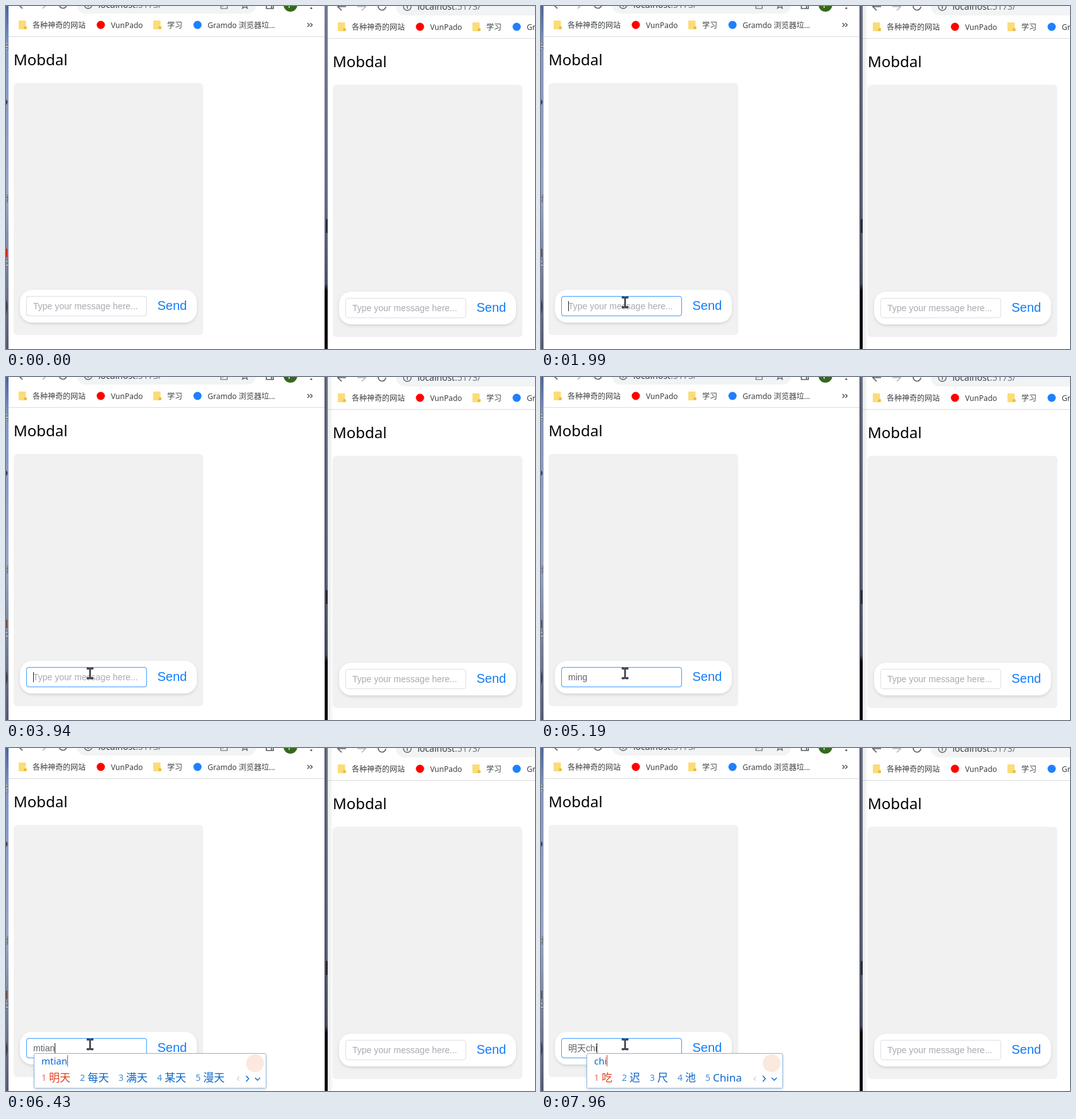
Write an HTML page that moves like this. It is 837 by 544 pixels and loops after 8000 ms.

```html
<!DOCTYPE html>
<html lang="zh-CN">
<head>
<meta charset="utf-8">
<style>
  html, body { margin: 0; width: 837px; height: 544px; overflow: hidden; background: #fff; }
  svg { display: block; }
  text { white-space: pre; }
  .ui { font: 12px "Noto Sans", "Noto Sans CJK SC", sans-serif; fill: #3c4043; }
  .url { font-size: 14px; }
  .title { font-size: 24px; fill: #000; }
  .field { font: 14px "Liberation Sans", "Noto Sans CJK SC", sans-serif; fill: #606266; }
  .hint { fill: #a8abb2; }
  .send { font: 20px "Liberation Sans", sans-serif; fill: #107cfb; }
  .ime { font: 17px "Noto Sans", "Noto Sans CJK SC", "DejaVu Sans", sans-serif; fill: #0a66cc; }
  .ime .num { font-size: 14px; fill: #3f8ed2; }
  .ime .first { fill: #e2401c; }
  .ime .num.first { fill: #ee6666; }
  .ime .typed { font-size: 15px; }
  .icon { fill: none; stroke: #5f6368; stroke-width: 1.7; }
</style>
</head>
<body>
<svg width="837" height="544" viewBox="0 0 837 544">
  <defs>
    <linearGradient id="desk" x2="0" y2="1">
      <stop offset="0" stop-color="#4a64a2"/>
      <stop offset=".12" stop-color="#8298c6"/>
      <stop offset=".55" stop-color="#99a7c8"/>
      <stop offset="1" stop-color="#555a72"/>
    </linearGradient>
    <linearGradient id="gap" x2="0" y2="1">
      <stop offset="0" stop-color="#717a92"/>
      <stop offset=".6" stop-color="#616a86"/>
      <stop offset=".81" stop-color="#4c5268"/>
      <stop offset=".83" stop-color="#0c0c10"/>
    </linearGradient>
    <linearGradient id="shade">
      <stop offset="0" stop-opacity=".13"/>
      <stop offset="1" stop-opacity="0"/>
    </linearGradient>
    <filter id="soft" x="-10%" y="-20%" width="120%" height="150%">
      <feDropShadow dx="0" dy="2" stdDeviation="2" flood-opacity=".13"/>
    </filter>
    <g id="folder">
      <path d="M1 0h9.500a1 1 0 0 1 1 1v8.500h1.500v3.500a1 1 0 0 1-1 1h-11a1 1 0 0 1-1-1v-12a1 1 0 0 1 1-1z" fill="#fbdc79"/>
      <path d="M8.500 13.500v-4h4v3.500z" fill="#e6b93c"/>
    </g>
    <g id="window">
      <rect x="4" y="-10" width="500" height="570" fill="#fff"/>
      <rect x="112" y="-16" width="284" height="28" rx="14" fill="#f1f3f4"/>
      <g class="icon">
        <path d="M33-2h-13M26-8l-6 6 6 6"/>
        <path d="M51-2h13M58-8l6 6-6 6" stroke="#b4b7ba"/>
        <path d="M96-2a6 6 0 1 1-2-5"/>
        <circle cx="130" cy="-2" r="6" stroke-width="1.400"/>
        <path d="M130-3v4.500" stroke-width="1.500"/>
        <path d="M340-3v7h10v-4M343 1q1-5 7-5" stroke-width="1.200"/>
        <path d="M378-8l1.800 4 4 .4-3 3 1 4.200-3.800-2.200-3.800 2.200 1-4.200-3-3 4-.4z" stroke-width="1.300"/>
        <path d="M412-7h11v11h-11zM420-7v11"/>
      </g>
      <text class="ui url" x="146" y="3">localhost<tspan fill="#70757a">:5173/</tspan></text>
      <circle cx="450" cy="-2" r="11" fill="#33691e"/>
      <path d="M448-6v9M448-1h5" stroke="#fff" stroke-width="1.300"/>
      <circle cx="483" cy="3.500" r="1.600" fill="#5f6368"/>
      <use href="#folder" x="20" y="23"/>
      <use href="#folder" x="233" y="23"/>
      <circle cx="150" cy="30" r="6.500" fill="#f00"/>
      <circle cx="303" cy="30" r="6.500" fill="#1e80ff"/>
      <g class="ui">
        <text x="42" y="35">各种神奇的网站</text>
        <text x="166" y="35">VunPado</text>
        <text x="255" y="35">学习</text>
        <text x="319" y="35">Gramdo 浏览器垃...</text>
        <text class="title" x="12" y="94">Mobdal</text>
      </g>
      <path class="icon" d="M477 27l3 3-3 3M481.500 27l3 3-3 3" stroke-width="1.400"/>
      <path d="M4 48.500h500" stroke="#dadce0"/>
      <rect x="12" y="122" width="300" height="400" rx="6" fill="#f1f1f1"/>
      <rect x="22" y="450" width="280" height="52" rx="20" fill="#fff" filter="url(#soft)"/>
      <rect x="32.500" y="460.500" width="190" height="31" rx="3.500" fill="#fff" stroke="#dcdfe6"/>
      <text class="send" x="239.500" y="482">Send</text>
    </g>
  </defs>

  <rect width="5" height="544" fill="url(#desk)"/>
  <path d="M0 58h3v2h-3M0 63h4v2h-4M0 67h3v2h-3M0 300h4v2h-4M0 305h4v2h-4M2 300v12M0 404h3v2h-3M0 410h4v2h-4" fill="#fff" stroke="#333" stroke-width=".6"/>
  <path d="M0 148q5 4 0 9M0 465q5 12 0 24" fill="#433c48"/>
  <path id="badge" d="M0 385h2v13h-2z"/>
  <rect x="504" width="6" height="544" fill="url(#gap)"/>
  <path d="M506 338h3v22h-3z" fill="#2b2e3c"/>

  <use href="#window" x="505" y="3"/>
  <text class="field hint" x="548" y="484">Type your message here...</text>
  <g id="active">
    <rect x="505" width="13" height="544" fill="url(#shade)"/>
    <path d="M504.500 0v544" stroke="#3d414d"/>
  </g>
  <use href="#window"/>
  <rect id="ring" x="32.500" y="460.500" width="190" height="31" rx="3.500" fill="none"/>
  <text id="hint" class="field hint" x="43" y="481">Type your message here...</text>
  <text id="value" class="field" x="43" y="481"></text>
  <rect id="caret" y="468" width="1" height="16" fill="#222"/>
  <g id="popup" class="ime"></g>
  <g id="mouse">
    <path id="arrow" d="M0 0v16l4-3.500 2.500 6 2.500-1-2.500-6h5z" fill="#fff" stroke="#000"/>
    <path id="beam" d="M-5-9h4l1 1 1-1h4v2.500h-4v13h4v2.500h-4l-1-1-1 1h-4v-2.500h4v-13h-4z" fill="#454a58" stroke="#20222a" stroke-width=".6"/>
  </g>
</svg>
<script>
const LOOP = 8000, CLICK = 925, BLINK = 530;
const $ = id => document.getElementById(id);
const [badge, active, ring, hint, value, caret, popup, mouse, arrow, beam] =
  ['badge', 'active', 'ring', 'hint', 'value', 'caret', 'popup', 'mouse', 'arrow', 'beam'].map($);

// time, committed text, text still being composed in the input method
const edits = [
  [CLICK, ''],
  [2350, 'm'], [2520, 'mi'], [2590, 'min'], [2660, 'ming'], [2860, 'mingt'],
  [3290, 'ming'], [3490, 'min'], [3650, 'mi'], [3790, 'm'], [3940, ''],
  [4320, 'm'], [4400, 'mi'], [4490, 'min'], [4580, 'ming'],
  [5200, 'min'], [5320, 'mi'], [5480, 'm'], [5640, ''],
  [6050, '', 'm'], [6110, '', 'mt'], [6170, '', 'mti'], [6270, '', 'mtia'], [6430, '', 'mtian'],
  [6810, '明天'], [7200, '明天', 'd'], [7610, '明天'],
  [7800, '明天', 'c'], [7870, '明天', 'ch'], [7940, '明天', 'chi']
];
const candidates = {
  m: ['吗', '没', '么', 'ლ(′◉❥◉｀ლ)', '买'],
  mtian: ['明天', '每天', '满天', '某天', '漫天'],
  d: ['的', '都', '打', '_(:з」∠)_', 'の'],
  c: ['从', '才', '次', '吃', '长'],
  ch: ['吃', '出', '车', '成', '长'],
  chi: ['吃', '迟', '尺', '池', 'China']
};
const advance = { 'ლ(′◉❥◉｀ლ)': 111, '_(:з」∠)_': 69, China: 45 };

const clamp = x => Math.max(0, Math.min(1, x));
const mix = (a, b, p) => a + (b - a) * p;
const show = (el, on) => el.style.display = on ? '' : 'none';

function popupMarkup(text, comp) {
  const left = 44 + 14 * text.length;
  let x = left + 12, items = '';
  (candidates[comp] || candidates.mtian).forEach((word, i) => {
    const first = i ? '' : ' first';
    items += `<text class="num${first}" x="${x}" y="528">${i + 1}</text>
      <text class="${first}" x="${x + 12}" y="529">${word}</text>`;
    x += 27 + (advance[word] || 17 * word.length);
  });
  const end = x - 15, right = end + 66;
  return `<rect x="${left + .5}" y="484.5" width="${right - left - 1}" height="55" rx="2" fill="#fff" stroke="#8fb6de" filter="url(#soft)"/>
    <circle cx="${right - 18}" cy="500" r="14" fill="#fbe8de"/>
    <text class="typed" x="${left + 12}" y="502">${comp}</text>
    <rect class="bar" y="487" width="1" height="18" fill="${comp.length > 2 ? '#e2401c' : '#0a4f9e'}"/>${items}
    <g fill="none" stroke="#0a66cc" stroke-width="1.4">
      <path d="M${end + 23} 521l-3 3.500 3 3.500" stroke="#cbd6e2"/>
      <path d="M${end + 34} 520l4 4.500-4 4.500M${end + 48} 523l4 4 4-4"/>
    </g>`;
}

let lastEdit;
function applyEdit(edit) {
  if (edit === lastEdit) return;
  lastEdit = edit;
  const [, text, comp = ''] = edit;
  value.textContent = text + comp;
  show(hint, !(text + comp));
  caret.setAttribute('x', Math.floor(43 + value.getComputedTextLength()));
  popup.innerHTML = comp ? popupMarkup(text, comp) : '';
  if (comp) {
    const typed = popup.querySelector('.typed');
    popup.querySelector('.bar').setAttribute('x',
      Math.round(+typed.getAttribute('x') + typed.getComputedTextLength()));
  }
}

function moveMouse(t) {
  const p = 1 - (1 - clamp((t - 230) / 520)) ** 2;
  const x = mix(622, 129, p) + 4 * clamp((t - 1290) / 160);
  const y = mix(538, 470, p);
  const over = x > 32 && x < 223 && y > 460 && y < 492;
  show(mouse, t >= 230);
  show(arrow, !over);
  show(beam, over);
  mouse.setAttribute('transform', `translate(${Math.round(x)} ${Math.round(y)})`);
  return over;
}

function frame() {
  const t = performance.now() % LOOP;
  const focused = t >= CLICK;
  const over = moveMouse(t);
  const edit = edits.findLast(e => e[0] <= t) || edits[0];
  applyEdit(edit);
  show(caret, focused && Math.floor((t - edit[0]) / BLINK) % 2 === 0);
  show(active, focused);
  badge.setAttribute('fill', focused ? '#7a4a30' : '#d8200c');
  const p = clamp((t - CLICK) / 165);
  const idle = over ? [192, 196, 204] : [220, 223, 230];
  ring.setAttribute('stroke', `rgb(${[64, 158, 255].map((c, i) => Math.round(mix(idle[i], c, p)))})`);
  requestAnimationFrame(frame);
}
frame();
</script>
</body>
</html>
```
